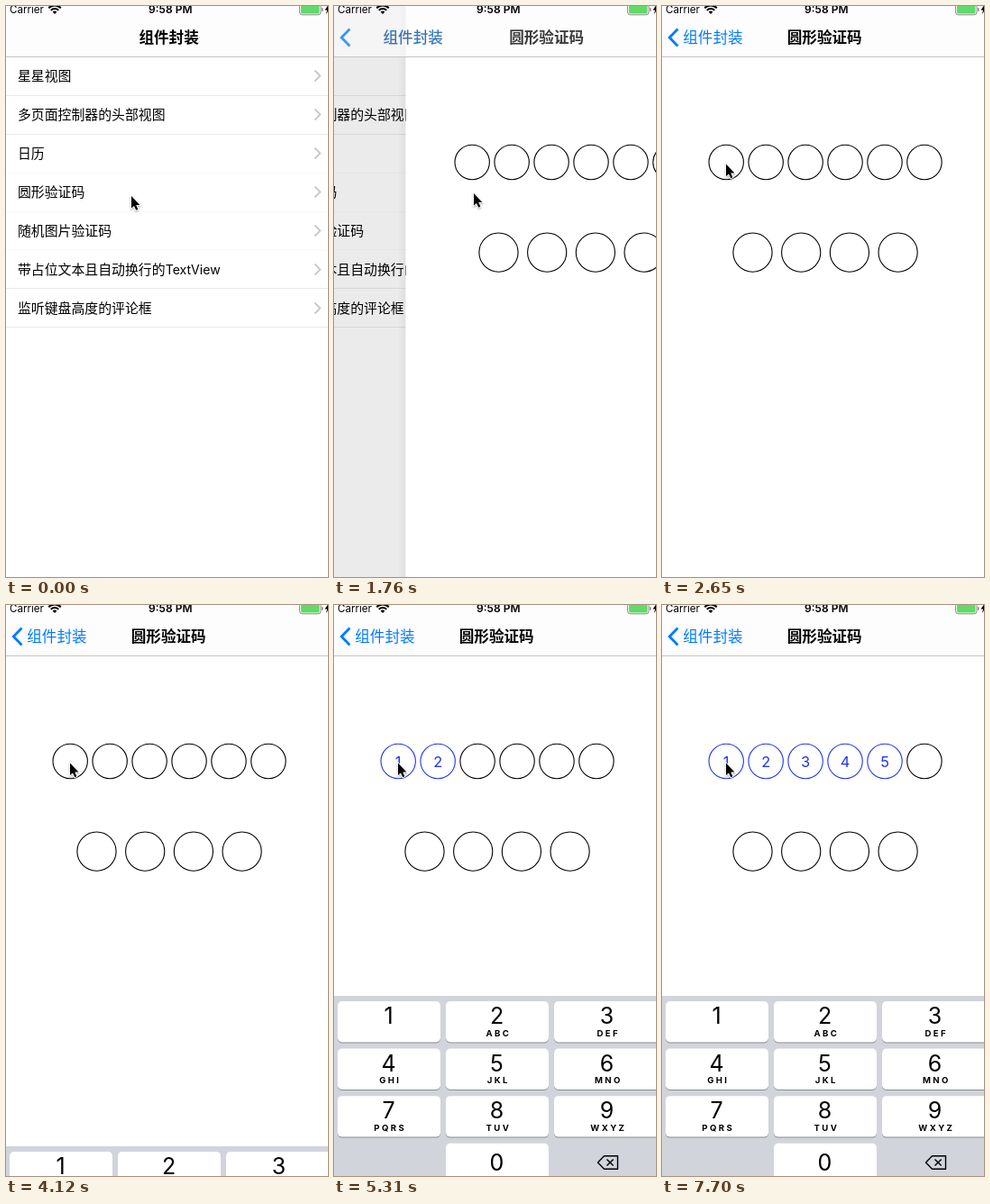
Recreate the animation shown at these times as an HTML page with a canvas. Size 357 px wide and 634 px high, loop 8000 ms.

```html
<!DOCTYPE html>
<html lang="zh-CN">
<head>
<meta charset="utf-8">
<style>
  html, body { margin: 0; height: 100%; overflow: hidden; background: #fff; }
  canvas { display: block; }
</style>
</head>
<body>
<canvas id="stage" width="357" height="634"></canvas>
<script>
const ctx = document.getElementById('stage').getContext('2d');
const WIDTH = 357, HEIGHT = 634, SCREEN = 362, LOOP = 8000;
const FONT = 'Inter, "Noto Sans CJK SC", "Noto Sans CJK", sans-serif';
const CJK = '"Noto Sans CJK SC", "Noto Sans CJK", sans-serif';
const TINT = '#007aff', CODE_BLUE = '#1f35ef';
const HOME = '组件封装', DETAIL = '圆形验证码';
const ROWS = ['星星视图', '多页面控制器的头部视图', '日历', DETAIL, '随机图片验证码',
  '带占位文本且自动换行的', '监听键盘高度的评论框'];
const KEYS = ['1', '2ABC', '3DEF', '4GHI', '5JKL', '6MNO', '7PQRS', '8TUV', '9WXYZ', '', '0'];

// Stepped tracks: [start time, value...]; each value holds until the next one.
const POINTER = [[0, 139, 211], [1470, 151, 209], [1620, 154, 208], [1760, 155, 208],
  [2210, 143, 207], [2350, 100, 191], [2500, 73.5, 179], [2650, 71, 175.5]];
const KEYBOARD_TOP = [[0, 650], [4120, 601], [4270, 481], [4420, 440.5], [4570, 435], [4720, 434]];
const TYPED = [[0, 0], [5010, 1], [5310, 2], [5760, 3], [6210, 4], [6660, 5], [7400, 6], [7700, 5]];
const PUSH_TICKS = [[0, 0], [1620, 1620], [1760, 1760], [1910, 1910], [2060, 2060], [2210, 2210]];

const held = (track, time) => track.filter(step => step[0] <= time).pop().slice(1);

// Critically damped spring: share of the push still to travel.
function pushRemaining(time) {
  const x = 18.3 * Math.max(0, held(PUSH_TICKS, time)[0] - 1605.5) / 1000;
  return (1 + x) * Math.exp(-x);
}

function text(string, x, y, size, { color = '#000', weight = 400, align = 'left',
  family = FONT, spacing = 0, alpha = 1 } = {}) {
  ctx.globalAlpha = alpha;
  ctx.font = `${weight} ${size}px ${family}`;
  ctx.letterSpacing = spacing + 'px';
  ctx.textAlign = align;
  ctx.fillStyle = color;
  ctx.fillText(string, x, y);
  ctx.globalAlpha = 1;
}

function rect(x, y, w, h, color, radius = 0) {
  ctx.fillStyle = color;
  ctx.beginPath();
  ctx.roundRect(x, y, w, h, radius);
  ctx.fill();
}

function stroke(points, color, width, closed = false) {
  ctx.beginPath();
  points.forEach(([x, y]) => ctx.lineTo(x, y));
  if (closed) ctx.closePath();
  ctx.strokeStyle = color;
  ctx.lineWidth = width;
  ctx.stroke();
}

function ring(x, y, radius, color) {
  ctx.beginPath();
  ctx.arc(x, y, radius, 0, 2 * Math.PI);
  ctx.strokeStyle = color;
  ctx.lineWidth = 1.1;
  ctx.stroke();
}

function drawList(shift) {
  ctx.save();
  ctx.translate(shift, 0);
  ROWS.forEach((label, i) => {
    const y = 78 + 43 * i;
    text(label, 13, y + 5.4, 14.88, { family: CJK });
    if (i === 5) text('TextView', 176.7, y + 5.2, 14.1);
    stroke([[342.3, y - 6.5], [348.3, y - .5], [342.3, y + 5.5]], '#c7c7cc', 1.8);
    const faint = i > 1 && i < 5;
    rect(0, Math.round(99 + 42.85 * i), SCREEN, 1, faint ? '#f8f8f8' : '#e9e9e9');
  });
  ctx.restore();
}

function drawDetail(offset, typed) {
  const edge = offset && offset - 2.5;
  const shade = ctx.createLinearGradient(edge - 9, 0, edge, 0);
  shade.addColorStop(0, 'rgba(0,0,0,0)');
  shade.addColorStop(1, 'rgba(0,0,0,.05)');
  rect(edge - 9, 0, 9, HEIGHT, shade);
  rect(edge, 0, SCREEN + 3, HEIGHT, '#fff');
  for (let i = 0; i < 6; i++) {
    const x = 71.2 + 43.95 * i + offset, filled = i < typed;
    ring(x, 173.5, 19.2, filled ? CODE_BLUE : '#000');
    if (filled) text(i + 1, x, 179.5, 16.4, { color: CODE_BLUE, align: 'center' });
  }
  for (let i = 0; i < 4; i++) ring(100.5 + 53.7 * i + offset, 273.6, 21.6, '#000');
}

function drawKeyboard(top) {
  rect(0, top, WIDTH, HEIGHT, '#d1d4db');
  KEYS.forEach((key, i) => {
    if (!key) return;
    const col = i % 3, x = 4 + 120 * col, w = col === 2 ? 118 : 114;
    const y = top + 6 + 52.6 * Math.floor(i / 3), mid = x + w / 2;
    rect(x, y + 1, w, 45.4, '#8b8d91', 4.8);
    rect(x, y, w, 45.4, '#fff', 4.8);
    text(key[0], mid - .5, y + (key === '0' ? 30.5 : 25), 25, { align: 'center' });
    text(key.slice(1), mid + 1.3, y + 38.5, 9.6, { weight: 700, align: 'center', spacing: 2.4 });
  });
  const y = top + 185;
  ctx.lineJoin = 'round';
  stroke([[292.5, y], [299.5, y - 7.3], [314.5, y - 7.3], [314.5, y + 7.3], [299.5, y + 7.3]], '#000', 1.4, true);
  stroke([[302.5, y - 3.6], [309.7, y + 3.6]], '#000', 1.4);
  stroke([[309.7, y - 3.6], [302.5, y + 3.6]], '#000', 1.4);
  ctx.lineJoin = 'miter';
}

function drawStatusBar() {
  text('Carrier', 4, 8, 11.6);
  text('9:58 PM', 182.3, 8, 12, { weight: 600, align: 'center' });
  ctx.strokeStyle = '#000';
  for (const [radius, width] of [[9.6, 2], [6, 2], [1.7, 3.4]]) {
    ctx.beginPath();
    ctx.arc(54, 9, radius, -.75 * Math.PI, -.25 * Math.PI);
    ctx.lineWidth = width;
    ctx.stroke();
  }
  ctx.beginPath();
  ctx.roundRect(325.5, -2.5, 23.5, 12.3, 3);
  ctx.strokeStyle = '#8a8a8a';
  ctx.lineWidth = 1;
  ctx.stroke();
  rect(327, -1, 20.5, 9.4, '#60da68', 1.5);
  rect(350, 2, 1.5, 4, '#8a8a8a', 1);
  ctx.fillStyle = '#000';
  ctx.fill(new Path2D('M358-2L353.5 4.5H356L355 9L359 3Z'));
}

function drawNavBar(remaining) {
  const shown = 1 - remaining;
  rect(0, 0, WIDTH, 56, 'rgba(252,252,252,.62)');
  rect(0, 56, WIDTH, 1, '#c4c4c6');
  drawStatusBar();
  const homeX = 23.2 + 124.2 * remaining + 18 * remaining * shown;
  if (shown > 0) {
    text(HOME, homeX, 41.2, 16.6, { color: TINT, family: CJK, alpha: shown });
    text(DETAIL, 138.7 + 245 * remaining, 41.2, 16.6, { weight: 700, family: CJK, alpha: shown });
    ctx.globalAlpha = shown;
    stroke([[17.5, 25.5], [8.3, 35], [17.5, 44.5]], TINT, 2.8);
    ctx.globalAlpha = 1;
  }
  text(HOME, homeX, 41.2, 16.6, { weight: 700, family: CJK, alpha: remaining });
}

function drawPointer(x, y) {
  const arrow = new Path2D('M0 0V13.6L3 10.9L5.3 15.8L7.4 14.8L5.2 10H9.4Z');
  ctx.save();
  ctx.translate(x, y);
  ctx.shadowColor = 'rgba(0,0,0,.35)';
  ctx.shadowBlur = 2;
  ctx.shadowOffsetY = 1;
  ctx.strokeStyle = '#fff';
  ctx.lineWidth = 1.8;
  ctx.stroke(arrow);
  ctx.shadowColor = 'transparent';
  ctx.fillStyle = '#000';
  ctx.fill(arrow);
  ctx.restore();
}

function draw(time) {
  const remaining = pushRemaining(time), shown = 1 - remaining;
  rect(0, 0, WIDTH, HEIGHT, '#fff');
  drawList(-.3 * SCREEN * shown);
  if (shown > 0) {
    rect(0, 0, WIDTH, HEIGHT, `rgba(0,0,0,${.1 * shown})`);
    const offset = remaining < .001 ? 0 : SCREEN * remaining;
    drawDetail(offset, held(TYPED, time)[0]);
  }
  drawKeyboard(held(KEYBOARD_TOP, time)[0]);
  drawNavBar(remaining);
  drawPointer(...held(POINTER, time));
}

const start = performance.now();
function tick() {
  draw((performance.now() - start) % LOOP);
  requestAnimationFrame(tick);
}
tick();
</script>
</body>
</html>
```
